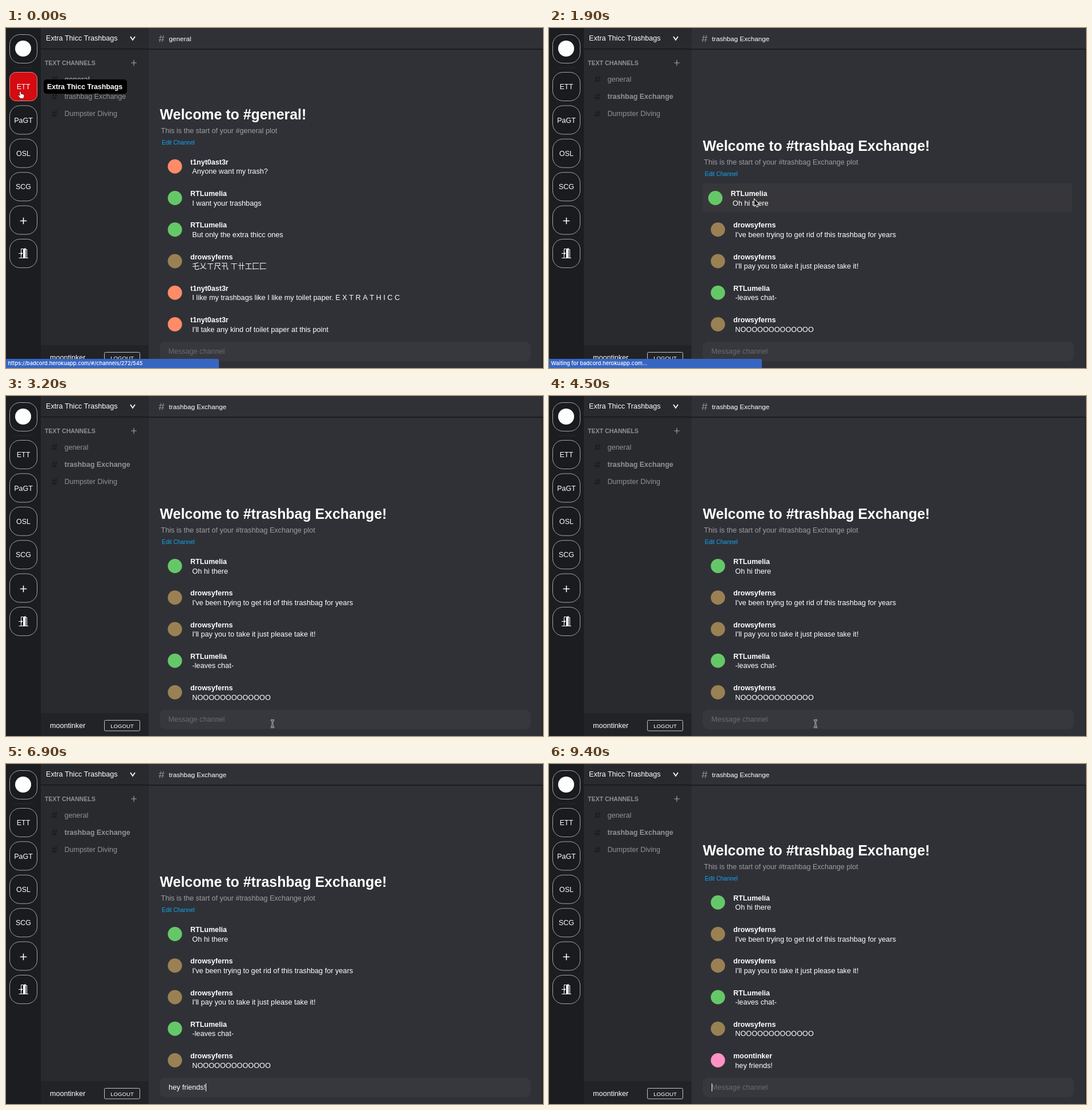
These frames come from a looping animation (941 px wide and 595 px high, 9.5 s). An HTML page with a canvas:

```html
<!DOCTYPE html>
<html lang="en">
<head>
<meta charset="utf-8">
<title>Chat</title>
<style>
html, body { margin: 0; width: 100%; height: 100%; overflow: hidden; background: #303136; }
canvas { display: block; }
</style>
</head>
<body>
<canvas id="stage" width="941" height="595"></canvas>
<script>
const ctx = document.getElementById('stage').getContext('2d');
const LOOP = 9500, STEP = 100;
const CLICK_CHANNEL = 700, STATUS_END = 2200, FOCUS = 3900, SEND = 7300, POST = 8300;
const ROW = 55.25, LAST_ROW = 493;
const SANS = '"Liberation Sans", Arial, sans-serif';
const SERVER = 'Extra Thicc Trashbags';
const CHANNELS = ['general', 'trashbag Exchange', 'Dumpster Diving'];
const DRAFT = 'hey friends!';
const KEY_TIMES = [4900, 5200, 5400, 5600, 6100, 6200, 6300, 6400, 6500, 6700, 6800, 6900];

const USERS = {
  toaster: ['t1nyt0ast3r', '#ff8c68'],
  lumelia: ['RTLumelia', '#65c868'],
  ferns: ['drowsyferns', '#9a8153'],
  self: ['moontinker', '#ff91c5'],
};
const GENERAL = [
  ['toaster', 'Anyone want my trash?'],
  ['lumelia', 'I want your trashbags'],
  ['lumelia', 'But only the extra thicc ones'],
  ['ferns', '乇乂ㄒ尺卂 ㄒ卄工匚匚'],
  ['toaster', 'I like my trashbags like I like my toilet paper. E X T R A T H I C C'],
  ['toaster', "I'll take any kind of toilet paper at this point"],
];
const EXCHANGE = [
  ['lumelia', 'Oh hi there'],
  ['ferns', "I've been trying to get rid of this trashbag for years"],
  ['ferns', "I'll pay you to take it just please take it!"],
  ['lumelia', '-leaves chat-'],
  ['ferns', 'N' + 'O'.repeat(13)],
];

// Pointer tip: time, x, y
const PATH = [
  [0, 24, 111], [200, 24, 111], [500, 137, 114], [1200, 137, 114],
  [1900, 360, 300], [2100, 375, 365], [2400, 385, 542], [3000, 467, 573],
];
const HAND = new Path2D('M2.5 1C3.5.3 4.2 1 4.4 2L5 5 6 4.6 7 5.2 8 4.9 8.8 5.6 9.8 5.8 10 8.5 8.8 12H3.8L.5 8C0 7 1 6.4 2 7.2L3.2 8Z');
const ARROW = new Path2D('M0 0V11L2.5 8.8 4.2 12.8 6 12 4.3 8.2H7.8Z');

function text(str, x, y, color = '#fff', size = 12.6, weight = 400, align = 'left', family = SANS) {
  ctx.font = `${weight} ${size}px ${family}`;
  ctx.fillStyle = color;
  ctx.textAlign = align;
  ctx.fillText(str, x, y);
}

function rect(x, y, w, h, color) {
  ctx.fillStyle = color;
  ctx.fillRect(x, y, w, h);
}

function box(x, y, w, h, radius, fill, stroke) {
  ctx.beginPath();
  ctx.roundRect(x, y, w, h, radius);
  if (fill) { ctx.fillStyle = fill; ctx.fill(); }
  if (stroke) { ctx.strokeStyle = stroke; ctx.lineWidth = 1; ctx.stroke(); }
}

function lines(color, width, ...strokes) {
  ctx.strokeStyle = color;
  ctx.lineWidth = width;
  ctx.beginPath();
  for (const [x, y, ...rest] of strokes) {
    ctx.moveTo(x, y);
    for (let i = 0; i < rest.length; i += 2) ctx.lineTo(rest[i], rest[i + 1]);
  }
  ctx.stroke();
}

function disc(x, y, r, color) {
  ctx.fillStyle = color;
  ctx.beginPath();
  ctx.arc(x, y, r, 0, Math.PI * 2);
  ctx.fill();
}

function hash(x, y, color) {
  lines(color, 1.1,
    [x - 1, y - 6, x - 3.5, y + 6], [x + 3.5, y - 6, x + 1, y + 6],
    [x - 4.5, y - 2.3, x + 5.2, y - 2.3], [x - 5.2, y + 2.3, x + 4.5, y + 2.3]);
}

function plus(x, y, r, color, width) {
  lines(color, width, [x - r, y, x + r, y], [x, y - r, x, y + r]);
}

const inside = (p, x, y, w, h) => p.x >= x && p.x < x + w && p.y >= y && p.y < y + h;

function pointerAt(t) {
  const next = PATH.findIndex(k => k[0] > t);
  if (next < 0) {
    const [, x, y] = PATH[PATH.length - 1];
    return { x, y };
  }
  const [t0, x0, y0] = PATH[next - 1], [t1, x1, y1] = PATH[next];
  const u = (t - t0) / (t1 - t0), e = u * u * (3 - 2 * u);
  return { x: x0 + (x1 - x0) * e, y: y0 + (y1 - y0) * e };
}

function drawRail(overServer) {
  rect(0, 0, 61, 595, '#1c1d21');
  ['', 'ETT', 'PaGT', 'OSL', 'SCG', '', ''].forEach((label, i) => {
    const y = i ? 77.5 + (i - 1) * 58.4 : 11.5;
    const hot = i === 1 && overServer;
    box(6.5, y, 48, 50, hot ? 11 : 18, hot ? '#d40b10' : '#1a1b1f', hot ? '#d98a8c' : '#a5a6a8');
    text(label, 30.5, y + 29.7, '#fff', 12.5, 400, 'center');
  });
  disc(30, 36, 14, '#fff');
  rect(14, 69, 33, 1, '#292b31');
  plus(30.5, 337.5, 5.7, '#fff', 1.6);
  lines('#fff', 1, [22.5, 402.5, 39, 402.5], [26.5, 402, 26.5, 386.5, 30, 386.5], [34, 387.5, 36.5, 387.5, 36.5, 402]);
  ctx.fillStyle = '#fff';
  ctx.fill(new Path2D('M30 386.5 34.5 385V403L30 402Z'));
  lines('#fff', 1.2, [22, 394.5, 28, 394.5], [26, 392.5, 28.5, 394.5, 26, 396.5]);
}

function drawSidebar(active, pointer) {
  rect(61, 0, 189, 595, '#282a2e');
  rect(61, 36, 189, 1.3, '#141518');
  text(SERVER, 70, 22);
  lines('#fff', 1.8, [218, 15, 222, 21, 226, 15]);
  text('TEXT CHANNELS', 68, 64.7, '#909195', 10.6, 700);
  plus(224, 61, 4.7, '#a8a9ac', 1.2);
  CHANNELS.forEach((name, i) => {
    const y = 89.5 + i * 30.3;
    const over = inside(pointer, 68, y - 15, 173, 30);
    if (over) {
      box(68, y - 15, 173, 30, 3, '#303136');
      text('X', 227.5, y + 5, '#909194', 12, 400, 'center');
    }
    hash(85, y, over ? '#08090a' : '#18191c');
    text(name, 102.5, y + 4.2, over ? '#fff' : '#929397', 12.5, i === active ? 700 : 400);
  });
  rect(61, 555, 189, 40, '#222327');
  text(USERS.self[0], 77, 581);
  box(172.5, 567.5, 62, 18.5, 2, null, '#c4c5c7');
  text('LOGOUT', 203.5, 580.5, '#fff', 9.6, 400, 'center');
}

function drawMessages(channel, messages, pointer) {
  rect(250, 36.5, 691, 1.3, '#101114');
  rect(939.5, 38, 1.5, 557, '#222327');
  hash(272.5, 18.5, '#909194');
  text(channel, 285.5, 22.7, '#fff', 11.7);

  const top = LAST_ROW - (messages.length - 1) * ROW;
  text(`Welcome to #${channel}!`, 269.5, top - 57, '#fff', 24.9, 700);
  text(`This is the start of your #${channel} plot`, 271.5, top - 32.7, '#9d9ea2');
  text('Edit Channel', 273, top - 12.7, '#10a5f2', 10.1);

  messages.forEach(([id, body], i) => {
    const y = top + i * ROW;
    const [name, color] = USERS[id];
    const over = inside(pointer, 269.5, y, 647, 50);
    const x = over ? -4.5 : 0;
    if (over) box(269.5, y, 647, 50, 4, '#37373b');
    disc(296 + x, y + 25.5, 12.5, color);
    text(name, 323 + x, y + 22, '#fff', 12.5, 700);
    text(body, 326.3 + x, y + 38.5, '#fff', 12.7, 400, 'left',
      '"Liberation Sans", Arial, "Noto Sans CJK JP", "Noto Sans CJK SC", sans-serif');
  });
}

function drawInput(t) {
  box(269.5, 549, 650, 34, 9, '#36383d');
  const typed = t < SEND ? DRAFT.slice(0, KEY_TIMES.filter(k => k <= t).length) : '';
  if (typed) text(typed, 285, 570);
  else text('Message channel', 284.5, 570, '#6b6c70');
  if (t < FOCUS) return;
  const lastEvent = Math.max(...[FOCUS, ...KEY_TIMES, SEND].filter(k => k <= t));
  if (Math.floor((t - lastEvent) / 500) % 2 === 0) {
    rect(Math.round(285 + (typed && ctx.measureText(typed).width)), 559, 1, 14, '#fff');
  }
}

function drawStatus(t) {
  if (t >= STATUS_END) return;
  box(0, 579, 373, 16, [0, 3, 0, 0], '#3766c2');
  const label = t < CLICK_CHANNEL
    ? 'https://badcord.herokuapp.com/#/channels/272/545'
    : 'Waiting for badcord.herokuapp.com...';
  text(label, 3.5, 590.3, '#fff', 9.3, 500, 'left', 'Inter, sans-serif');
}

function drawPointer({ x, y }) {
  if (y > 549 && x > 270) {
    const beam = [[x - 3, y - 6, x, y - 5, x, y + 6, x - 3, y + 7],
      [x + 3, y - 6, x, y - 5], [x, y + 6, x + 3, y + 7], [x - 2, y + 3, x + 2, y + 3]];
    lines('#fff', 2.4, ...beam);
    lines('#111', 1, ...beam);
    return;
  }
  const hand = x < 61 || inside({ x, y }, 68, 74, 173, 91);
  ctx.save();
  ctx.translate(hand ? x - 2.5 : x, y);
  ctx.lineWidth = hand ? 1 : 1.8;
  ctx.strokeStyle = hand ? '#111' : '#fff';
  ctx.fillStyle = hand ? '#fff' : '#111';
  const shape = hand ? HAND : ARROW;
  ctx.stroke(shape);
  ctx.fill(shape);
  ctx.restore();
}

function draw(t) {
  const visible = t < KEY_TIMES[0];
  const pointer = visible ? pointerAt(t) : { x: -99, y: -99 };
  const active = t < CLICK_CHANNEL ? 0 : 1;
  const messages = active ? [...EXCHANGE] : GENERAL;
  if (t >= POST) messages.push(['self', DRAFT]);
  const overServer = inside(pointer, 6, 77, 49, 51);

  rect(0, 0, 941, 595, '#303136');
  drawRail(overServer);
  drawSidebar(active, pointer);
  drawMessages(CHANNELS[active], messages, pointer);
  drawInput(t);
  if (overServer) {
    box(66, 90, 146, 25, 5, '#000');
    text(SERVER, 72, 106.5, '#fff', 12.4, 700);
  }
  drawStatus(t);
  if (visible) drawPointer(pointer);
}

const start = performance.now();
function tick() {
  const t = (performance.now() - start) % LOOP;
  draw(Math.floor(t / STEP) * STEP);
  requestAnimationFrame(tick);
}
tick();
</script>
</body>
</html>
```
